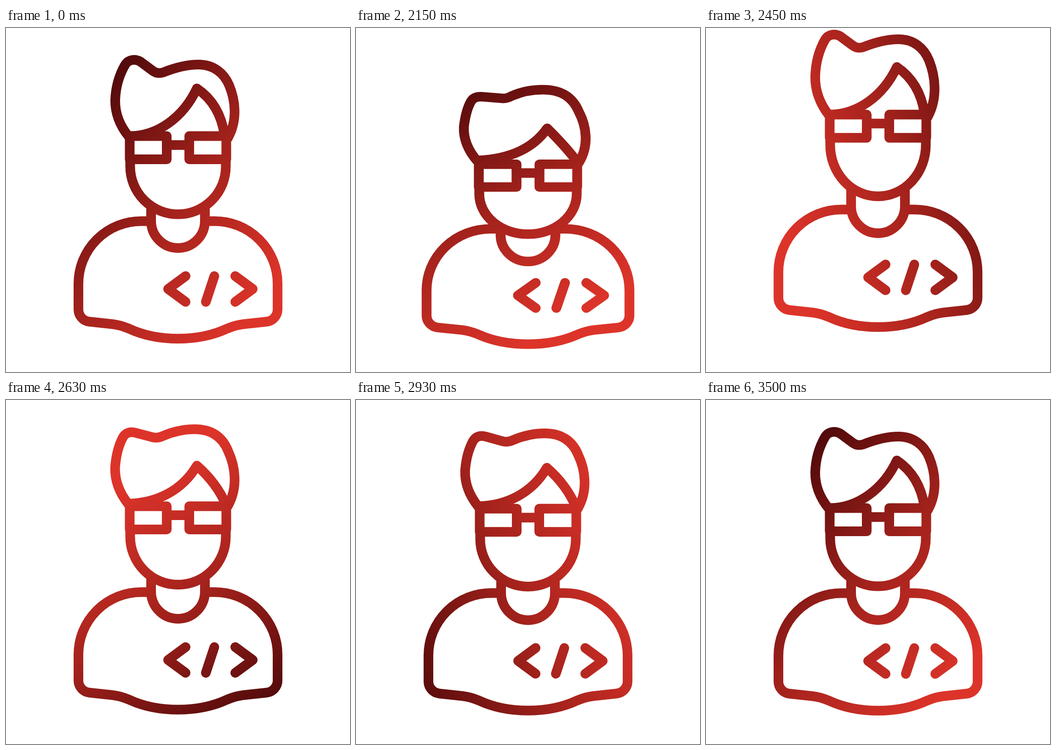
Write an HTML page with a canvas that moves like this. It is 748 by 748 pixels and loops after 3530 ms.

```html
<!DOCTYPE html>
<html>
<head>
<meta charset="utf-8">
<style>
  html, body { margin: 0; height: 100%; overflow: hidden; background: #fff; }
  canvas { display: block; }
</style>
</head>
<body>
<canvas id="stage" width="748" height="748"></canvas>
<script>
const ctx = document.getElementById('stage').getContext('2d');
const LOOP = 3530, START = 2000, STEP = 30, LENGTH = 1500, MID = 374;

// Left half of the symmetric parts; the right half is mirrored.
const bodyHalf = 'M308,420 H294 A136.5,136 0 0 0 157.5,556 V612 C157.5,626 168,637 181,638.5 L232,644 C246,645.5 256,649 268,654 C298,668 335,675.5 374,675.5';
const glassesHalf = 'M269,235 H349.5 V285.5 H269 Z M349.5,254.5 H374';
const code = 'M390.5,539.5 L352.5,567.5 L390.5,595.5 M453,539.5 L434.5,595.5 M498.5,539.5 L536.5,567.5 L498.5,595.5';

const hair = 'M267,236 C247,212 237,184 237.5,157 C238.5,125 248,99 259,80 C266,68.5 280,66.5 292,73 L319,93 C326,98.5 334,99 342,96.5 C367,86.5 392,79.5 419,79.5 C451,79.5 474,98 485,124 C498,155 505,200 482,240';
const flatHair = 'M265,226 C246,203 236,180 237,152 C240,130 245,110 251,99 C256,90 264,88 274,88 L316,88.5 C326,89 332,86 340,81.5 C358,73 380,68.5 403,68.5 C448,68.5 470,88 482,118 C498,148 506,192 482,231';
const fringe = 'M270,235 C330,234 385,195 415,131.5 C447,153 468,186 475,232';
const flatFringe = 'M268,225 C325,222 380,208 415,159.5 C437,184 460,208 481,231';

// Blends two paths; lift raises the parts farthest above the forehead.
function morph(from, to, amount, lift) {
  const goal = to.match(/[\d.]+/g);
  let i = 0;
  return from.replace(/[\d.]+/g, text => {
    const value = +text + (goal[i] - text) * amount;
    const isY = i++ % 2;
    return isY ? value + lift * Math.min(1, Math.max(0, 236 - value) / 140) : value;
  });
}

// Smooth rise to 1 at the peak and back to 0.
function pulse(t, from, peak, to) {
  if (t <= from || t >= to) return 0;
  const u = t < peak ? (t - from) / (peak - from) : (to - t) / (to - peak);
  return Math.sin(u * Math.PI / 2) ** 2;
}

function pose(t) {
  const crouch = pulse(t, -10, 90, 250) + pulse(t, 655, 780, 930);
  const hop = pulse(t, 200, 480, 665);
  const nod = pulse(t, 30, 155, 390) + pulse(t, 640, 785, 950);
  const rebound = pulse(t, 900, 1080, 1200), settle = pulse(t, 1150, 1260, LENGTH);
  return {
    squash: .027 * crouch,
    bodyY: 17 * crouch - 26 * hop - 4 * rebound + 5 * settle,
    headY: 42 * nod - 22 * hop - rebound,
    flat: pulse(t, 30, 190, 440) + pulse(t, 460, 780, 1090),
    lift: -9 * pulse(t, 100, 520, 790) - 5 * pulse(t, 800, 1060, 1400)
  };
}

// The gradient makes one turn and leans toward its dark end on the way.
function paint(t) {
  const u = 1 - (1 - t / LENGTH) ** 1.4;
  const turn = u * u * (3 - 2 * u);
  const angle = (220 + 360 * turn) * Math.PI / 180;
  const shift = 65 * Math.sqrt(Math.abs(Math.sin(Math.PI * turn)));
  const at = r => [MID + r * Math.cos(angle), MID + r * Math.sin(angle)];
  const gradient = ctx.createLinearGradient(...at(shift + 285), ...at(shift - 285));
  ['#520a0b', '#a3221c', '#dd342a'].forEach((c, i) => gradient.addColorStop(i / 2, c));
  return gradient;
}

function draw(t) {
  const { squash, bodyY, headY, flat, lift } = pose(t);
  const cheek = 301 + headY, jaw = 104 - .36 * headY;
  const nape = cheek + .827 * jaw, collar = 419.5 + .33 * headY;

  const half = new Path2D(bodyHalf
    + `M270,${cheek - 12} V${cheek} A104,${jaw} 0 0 0 374,${cheek + jaw}`
    + `M315.5,${nape} V${collar} A58.5,59 0 0 0 374,${collar + 59}`);
  const headShift = new DOMMatrix([1, 0, 0, 1, 0, headY]);
  half.addPath(new Path2D(glassesHalf), headShift);

  const art = new Path2D(code);
  art.addPath(half);
  art.addPath(half, new DOMMatrix([-1, 0, 0, 1, 2 * MID, 0]));
  art.addPath(new Path2D(morph(hair, flatHair, flat, lift)
    + morph(fringe, flatFringe, flat, 0)), headShift);

  ctx.setTransform(1, 0, 0, 1, 0, 0);
  ctx.fillStyle = '#fff';
  ctx.fillRect(0, 0, 748, 748);
  ctx.setTransform(1 + squash, 0, 0, 1 - squash, -MID * squash, bodyY + 686 * squash);
  ctx.lineWidth = 21;
  ctx.lineCap = ctx.lineJoin = 'round';
  ctx.strokeStyle = paint(t);
  ctx.stroke(art);
}

function frame() {
  const t = Math.floor((performance.now() % LOOP - START) / STEP) * STEP;
  draw(t < STEP ? LENGTH : Math.min(t, LENGTH));
  requestAnimationFrame(frame);
}
frame();
</script>
</body>
</html>
```
